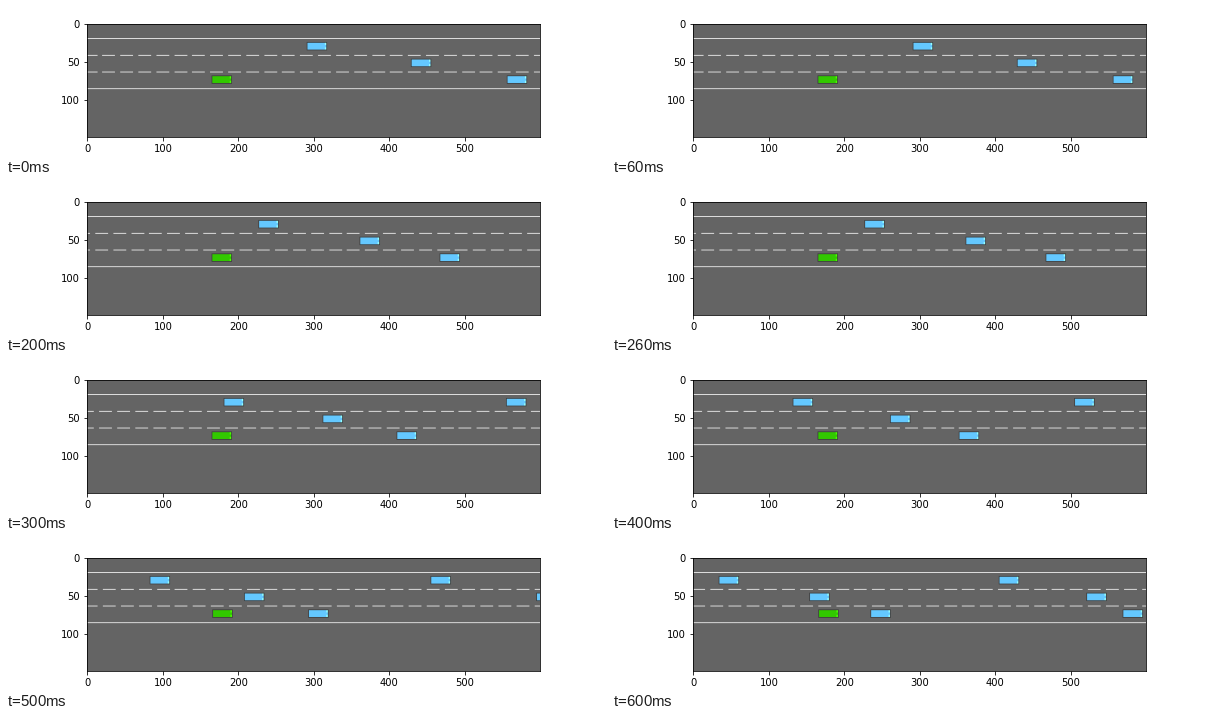
Write a matplotlib script that moves like this. It is 600 by 150 pixels and loops after 0.7 s.

```python
import matplotlib.pyplot as plt
import numpy as np
from matplotlib.animation import FuncAnimation

W, H, DPI = 600, 150, 72
STEPS, STEP_MS = 7, 100           # each step is one second of driving
SCALE = 5.5                       # road pixels per metre
LANE = 22                         # lane height in road pixels
STRIPE_GAP, STRIPE_LEN = 4.33, 3  # metres
CAR_L, CAR_W = 27, 11

ROAD, WHITE, EDGE = (100, 100, 100), (255, 255, 255), (60, 60, 60)
BLUE, GREEN = (100, 200, 255), (50, 200, 0)

# lane, start (m), speed (m/s), speed drift
TRAFFIC = [
    (0, 53.0, 21.0, 0),
    (1, 78.1, 20.75, -0.05),
    (2, 101.2, 18.6, 0.078),
    (0, 121.6, 20.8, 0),
    (1, 168.5, 16.5, 0),
    (2, 159.3, 19.5, 0),
]


def travel(t):
    """Metres the green car has driven, easing up to 30 m/s."""
    return 30 * t - 7.3 * (1 - 0.36 ** t)


def box(road, x, y, w, h, color):
    road[y:y + h, max(x, 0):max(x + w, 0)] = color


def draw_car(road, x, lane, color):
    x, y = int(x), 25 + lane * LANE
    lamp = [min(int(c / 0.68), 255) for c in color]
    box(road, x, y, CAR_L, CAR_W, EDGE)
    box(road, x + 1, y + 1, CAR_L - 2, CAR_W - 2, color)
    for dy in (1, 7):
        box(road, x + 24, y + dy, 2, 3, lamp)


def draw_road(t):
    road = np.full((H, W, 3), ROAD, dtype=np.uint8)
    road[[20, 20 + 3 * LANE]] = WHITE
    shift = travel(t) % STRIPE_GAP
    for start in np.arange(-1, W / SCALE / STRIPE_GAP + 2) * STRIPE_GAP - shift:
        a = int(np.floor(start * SCALE - 3))
        for lane in (1, 2):
            box(road, a, 20 + lane * LANE, int(STRIPE_LEN * SCALE) + 1, 1, WHITE)
    for lane, start, speed, drift in TRAFFIC:
        gap = start + speed * t + drift * t * t - travel(t)
        draw_car(road, gap * SCALE, lane, BLUE)
    draw_car(road, 165 + t / 5, 2, GREEN)
    return road


fig, ax = plt.subplots(figsize=(W / DPI, H / DPI), dpi=DPI)
fig.subplots_adjust(left=0.125, right=0.9, bottom=0.125, top=0.88)
view = ax.imshow(draw_road(0))
ax.set_xticks(range(0, W, 100))
ax.set_yticks(range(0, H, 50))


def update(step):
    view.set_data(draw_road(step))
    return [view]


anim = FuncAnimation(fig, update, frames=STEPS, interval=STEP_MS,
                     repeat=True, repeat_delay=0)
plt.show()
```
